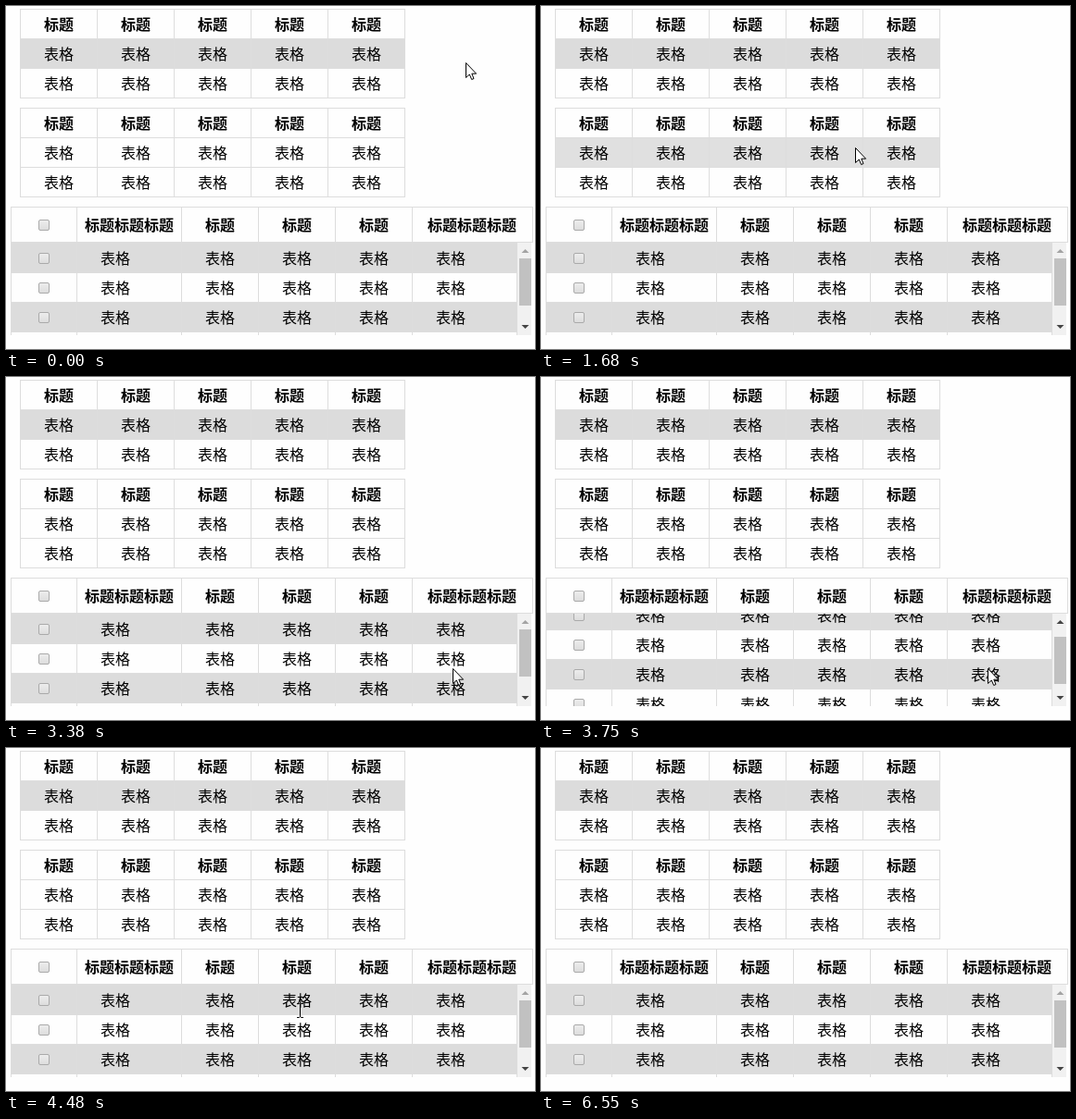
These frames come from a looping animation (571 by 371 pixels, 6.79 s). An HTML page:

```html
<!DOCTYPE html>
<html lang="zh-CN">
<head>
<meta charset="utf-8">
<title>表格</title>
<style>
html, body { margin: 0; width: 100%; height: 100%; overflow: hidden; background: #fefefe; }
svg { display: block; width: 571px; height: 371px; }
text { font: 350 16px "Noto Sans CJK SC", "Noto Sans CJK", "Noto Sans CJK JP", sans-serif; fill: #000; }
text.head { font-weight: 700; }
</style>
</head>
<body>
<svg id="stage" viewBox="0 0 571 371" xmlns="http://www.w3.org/2000/svg">
  <defs>
    <linearGradient id="box" x2="0" y2="1">
      <stop stop-color="#ededed"/><stop offset="1" stop-color="#dcdcdc"/>
    </linearGradient>
    <clipPath id="view"><rect x="0" y="256" width="571" height="100"/></clipPath>
  </defs>
</svg>
<script>
const LOOP = 6790, STEP = 120, ROW = 32, COL = 83, SCROLL = 29;
const LINE = '#ddd', FILL = '#dcdcdc';
const stage = document.getElementById('stage');
const range = (n, from, gap) => Array.from({ length: n }, (_, i) => from + gap * i);

function add(parent, tag, attrs, str) {
  const el = document.createElementNS(stage.namespaceURI, tag);
  for (const k in attrs) el.setAttribute(k, attrs[k]);
  if (str) el.textContent = str;
  return parent.appendChild(el);
}
const rect = (p, x, y, width, height, fill) =>
  add(p, 'rect', { x, y, width, height, fill, 'shape-rendering': 'crispEdges' });
const label = (p, x, mid, str, head) =>
  add(p, 'text', { x, y: mid + 6, class: head ? 'head' : 'cell' }, str);
function grid(p, xs, ys) {
  const [l, t, r, b] = [xs[0], ys[0], xs.at(-1), ys.at(-1)];
  xs.forEach(x => rect(p, x, t, 1, b - t + 1, LINE));
  ys.forEach(y => rect(p, l, y, r - l + 1, 1, LINE));
}

// Small tables: returns the fills of the two body rows
function smallTable(top) {
  const fills = [1, 2].map(i => rect(stage, 15, top + ROW * i, 416, ROW, FILL));
  grid(stage, range(6, 15, COL), range(4, top, ROW));
  for (const x of range(5, 41, COL))
    for (let r = 0; r < 3; r++)
      label(stage, x, top + 17 + ROW * r, r ? '表格' : '标题', !r);
  return fills;
}
smallTable(3)[1].setAttribute('opacity', 0);
const hoverRows = smallTable(110);

// Large table
const cols = [5, 76, ...range(4, 189, COL)];
const ticks = [];
function checkbox(parent, mid) {
  const frame = add(parent, 'rect', {
    x: 35.5, y: mid - 5.5, width: 11, height: 11, rx: 1.5, fill: 'url(#box)', stroke: '#aaa'
  });
  ticks.push(add(parent, 'path', {
    d: `M37.5 ${mid}l2.6 3l4.6-6.4`, fill: 'none', stroke: '#333', 'stroke-width': 2
  }));
  return frame;
}
const view = add(stage, 'g', { 'clip-path': 'url(#view)' });
const body = add(view, 'g', {});
for (const top of [256, 256 + 2 * ROW]) rect(body, 5, top, 547, ROW + 1, FILL);
grid(body, [...cols, 551], range(5, 256, ROW));
for (const mid of range(4, 273, ROW)) {
  checkbox(body, mid);
  [102, ...range(4, 215, COL)].forEach(x => label(body, x, mid, '表格'));
}
grid(stage, [...cols, 568], [217, 255]);
const allBox = checkbox(stage, 237);
range(3, 215, COL).forEach(x => label(stage, x, 237, '标题', true));
[85, 455].forEach(x => label(stage, x, 237, '标题标题标题', true));

// Scrollbar
rect(stage, 552, 256, 15, 100, '#f1f1f1');
const thumb = rect(stage, 554, 273, 13, 51, '#c1c1c1');
const up = add(stage, 'path', { d: 'M556.5 267h8l-4-4z' });
const down = add(stage, 'path', { d: 'M556.5 345h8l-4 4z' });

// Pointers
const arrow = add(stage, 'path', {
  d: 'M.5 .5V16.5L4.3 13L6.7 18.5L9 17.5L6.8 12.2H11.6Z', fill: '#fff', stroke: '#000'
});
const beam = add(stage, 'path', {
  d: 'M-3 -7.5h2.5l1 1l1-1h2.5M.5 -7v14M-3 7.5h2.5l1-1l1 1h2.5', fill: 'none', stroke: '#000'
});

// Pointer runs: start time, steps, end point, optional bend of the curve
const home = [496, 61];
const runs = [
  [360, 4, [458, 66]],
  [960, 6, [339, 151], [-310, 60]],
  [1680, 1, [339, 153]],
  [2050, 6, [333, 206], [333, 179]],
  [2780, 6, [482, 315], [625, 300]],
  [4240, 1, [480, 317]],
  [4360, 5, [73, 235]],
  [4960, 3, [49, 235], [55, 222]],
  [5320, 1, [41, 236]],
  [6050, 5, [570, 400], [420, 300]]
];

// Share of a stepped move done at time t
const done = (t, from, n) => Math.min(n, Math.max(0, Math.floor((t - from) / STEP) + 1)) / n;
const fade = (t, from) => 1 - (1 - done(t, from, 2)) ** 3;

function pointer(t) {
  let p = home;
  for (const [from, n, end, bend] of runs) {
    const u = done(t, from, n);
    p = p.map((a, i) => {
      const c = bend ? bend[i] : (a + end[i]) / 2;
      return (1 - u) ** 2 * a + 2 * u * (1 - u) * c + u * u * end[i];
    });
  }
  return p.map(Math.round);
}

const show = (el, on) => el.setAttribute('visibility', on ? 'visible' : 'hidden');

function draw(t) {
  const [x, y] = pointer(t);
  const shift = done(t, 3750, 2) - done(t, 4360, 2);
  const typing = t >= 3870 && t < 4600;
  const over = x >= 35 && x <= 50 && y >= 230 && y <= 242;
  [1680, 2290, 2780].slice(0, 2).forEach((on, i) =>
    hoverRows[i].setAttribute('opacity', fade(t, on) - fade(t, i ? 2780 : 2290)));
  body.setAttribute('transform', `translate(0 ${-Math.round(SCROLL * shift)})`);
  thumb.setAttribute('y', 273 + Math.round(15 * shift));
  up.setAttribute('fill', shift > 0 ? '#444' : '#a3a3a3');
  down.setAttribute('fill', shift < 1 ? '#444' : '#a3a3a3');
  allBox.setAttribute('stroke', over ? '#888' : '#aaa');
  ticks.forEach(el => show(el, t >= 5440 && t < 5930));
  for (const el of [arrow, beam]) el.setAttribute('transform', `translate(${x} ${y})`);
  show(arrow, !typing);
  show(beam, typing);
}

const start = performance.now();
function tick() {
  draw((performance.now() - start) % LOOP);
  requestAnimationFrame(tick);
}
tick();
</script>
</body>
</html>
```
